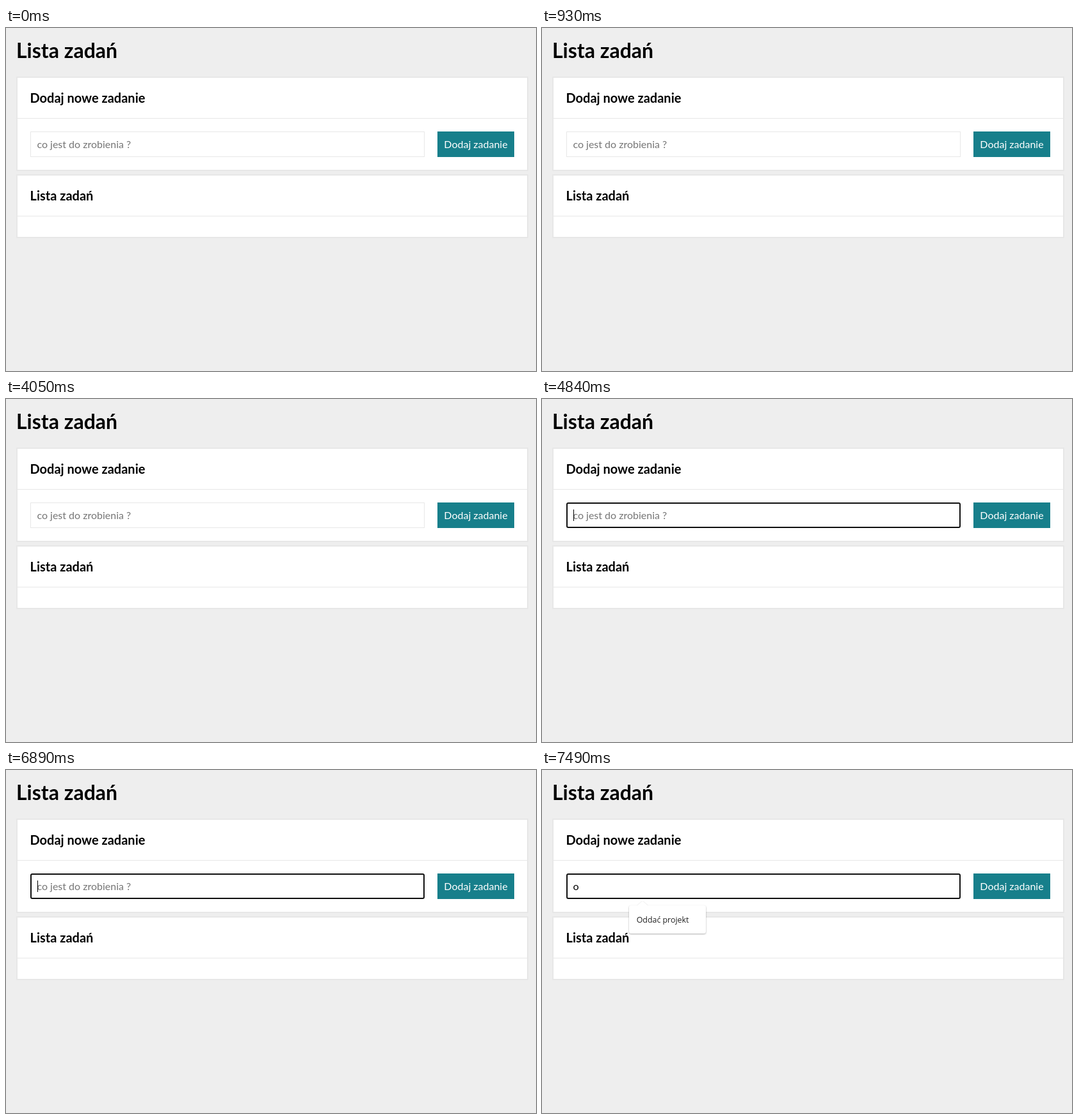
An HTML page for the animation above (8000 ms loop, 828x537 px).

```html
<!DOCTYPE html>
<html lang="pl">
<head>
<meta charset="utf-8">
<title>Lista zadań</title>
<style>
  html, body { margin: 0; width: 100%; height: 100%; overflow: hidden; background: #eee; }
  svg { display: block; width: 828px; height: 537px; font-family: Lato, sans-serif; }
  text { white-space: pre; }
  h1, .title { font-weight: 700; }
  .title { font-size: 20px; }
  .body { font-size: 16px; }
  .card { fill: #fff; stroke: #e7e7e7; stroke-width: 2; }
  .rule { fill: #e7e7e7; }
  .bubble { fill: #fff; filter: drop-shadow(0 1px 1.2px rgba(0, 0, 0, .32)); }
  .hint { font: 12.4px "Open Sans", "Noto Sans", sans-serif; fill: #222; }
</style>
</head>
<body>
<svg viewBox="0 0 828 537">
  <rect width="828" height="537" fill="#eee"/>
  <text class="title" x="16" y="47" style="font-size:32px">Lista zadań</text>

  <rect class="card" x="17" y="77" width="798" height="146"/>
  <rect class="rule" x="18" y="141" width="796" height="1"/>
  <text class="title" x="37.5" y="117">Dodaj nowe zadanie</text>

  <rect id="idle" x="38.5" y="162.5" width="615" height="39" fill="#fff" stroke="#e7e7e7"/>
  <rect id="focus" x="39" y="163" width="614" height="38" rx="2" fill="#fff" stroke="#101010" stroke-width="2"/>
  <text id="prompt" class="body" x="48.4" y="188" fill="#757575">co jest do zrobienia ?</text>
  <text id="typed" class="body" x="48.4" y="188">o</text>
  <rect id="caret" y="173" width="1" height="18"/>

  <rect x="674" y="162" width="120" height="40" fill="#177f8b"/>
  <text class="body" x="734" y="188" fill="#fff" text-anchor="middle">Dodaj zadanie</text>

  <rect class="card" x="17" y="230" width="798" height="98"/>
  <rect class="rule" x="18" y="294" width="796" height="1"/>
  <text class="title" x="37.5" y="270">Lista zadań</text>

  <g id="popup">
    <path class="bubble" d="M139 212H149L157 205L165 212H253Q256 212 256 215V253Q256 256 253 256H139Q136 256 136 253V215Q136 212 139 212Z"/>
    <text class="hint" x="147.7" y="239">Oddać projekt</text>
  </g>

  <path id="pointer" d="M.5 .5V16.5L4.2 13L6.7 18.5L9 17.5L6.6 12H11.8Z" fill="#fff" stroke="#000"/>
</svg>
<script>
  const LOOP = 8000;
  // [start ms, field focused, caret x (0 = hidden), letter typed]
  const steps = [
    [0, 0, 0, 0],
    [3970, 1, 49, 0],
    [4050, 0, 0, 0],
    [4840, 1, 49, 0],
    [5370, 1, 0, 0],
    [5830, 1, 49, 0],
    [6430, 1, 0, 0],
    [6890, 1, 49, 0],
    [6960, 1, 57, 1],
    [7490, 1, 0, 1]
  ];
  const pass = { from: 400, to: 930, poses: 8 };

  const el = id => document.getElementById(id);
  const show = (id, on) => el(id).setAttribute('visibility', on ? 'visible' : 'hidden');

  // The pointer swings in from the right edge and back out.
  function drawPointer(t) {
    const on = t >= pass.from && t < pass.to;
    show('pointer', on);
    if (!on) return;
    const pose = Math.floor((t - pass.from) / (pass.to - pass.from) * pass.poses);
    const u = pose / (pass.poses - 1);
    const x = 822 - 34 * Math.sin(Math.PI * u);
    const y = 509 - 51 * u;
    el('pointer').setAttribute('transform', `translate(${Math.round(x)} ${Math.round(y)})`);
  }

  function draw(t) {
    const [, focused, caretX, typed] = steps.findLast(s => s[0] <= t);
    show('idle', !focused);
    show('focus', focused);
    show('caret', caretX);
    el('caret').setAttribute('x', caretX);
    show('prompt', !typed);
    show('typed', typed);
    show('popup', typed);
    drawPointer(t);
  }

  const start = performance.now();
  function tick() {
    draw((performance.now() - start) % LOOP);
    requestAnimationFrame(tick);
  }
  tick();
</script>
</body>
</html>
```
